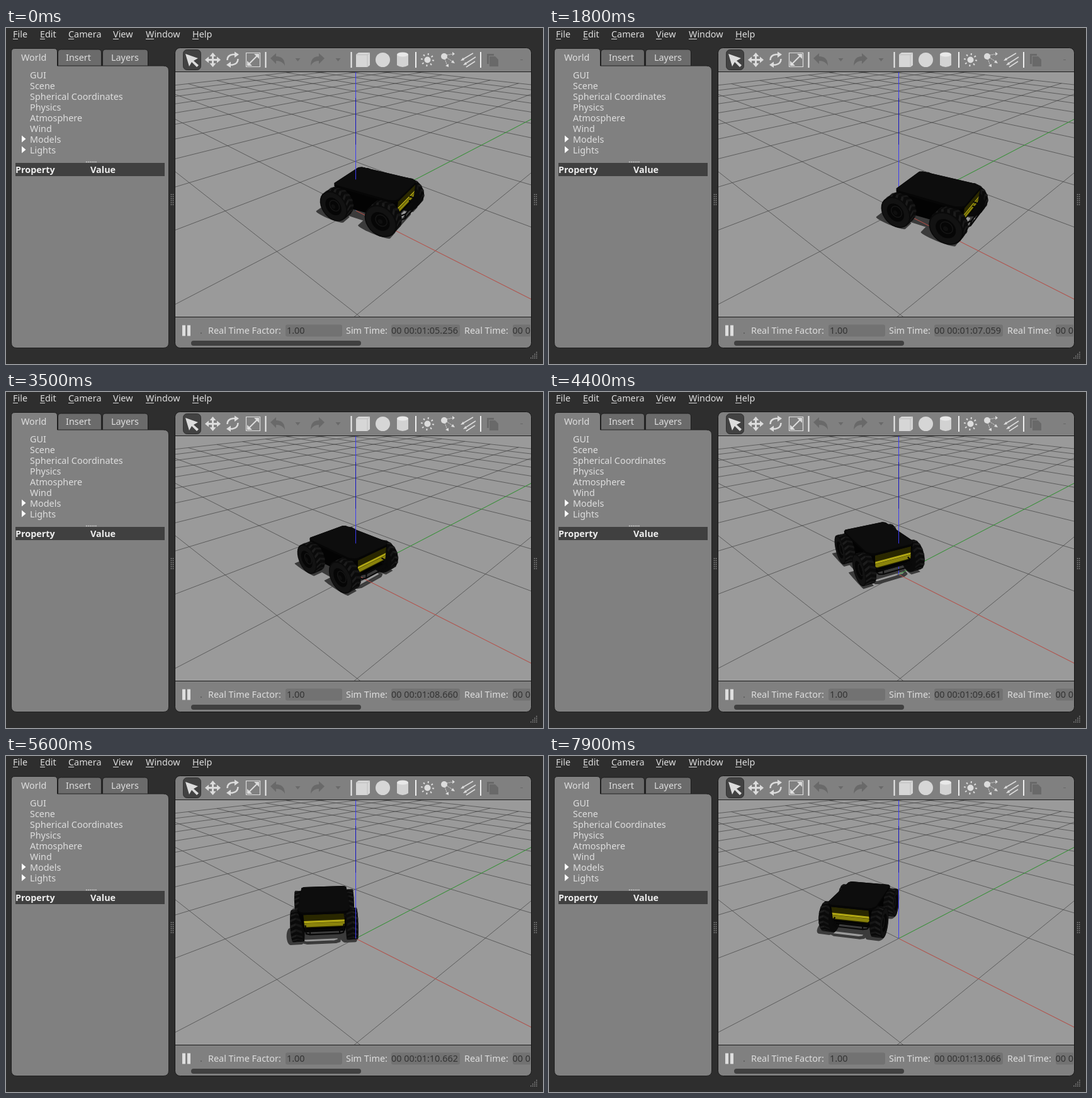
Write an HTML page with a canvas that moves like this. It is 853 px wide and 533 px high and loops after 8 s.

```html
<!DOCTYPE html>
<html lang="en">
<head>
<meta charset="utf-8">
<title>Robot simulator</title>
<style>
html, body { margin: 0; width: 100%; height: 100%; overflow: hidden; background: #2e2e2e; }
svg, canvas { position: absolute; display: block; }
svg { left: 0; top: 0; }
canvas { left: 269px; top: 70px; }
text { font: 14.4px "Noto Sans", "Open Sans", sans-serif; fill: #dedede; white-space: pre; }
.b { font-weight: bold; fill: #eee; }
.d { fill: #333; }
.w { fill: #dcdcdc; }
.g { fill: #696969; }
.l { fill: none; stroke: #dcdcdc; }
</style>
</head>
<body>
<svg width="853" height="533" viewBox="0 0 853 533">
  <g id="menu"></g>
  <!-- left panel -->
  <path d="M82.500 60V39q0-5 5-5H146.500q5 0 5 5V60M153.500 60V39q0-5 5-5H220.500q5 0 5 5V60" fill="#6b6b6b" stroke="#1c1c1c"/>
  <path d="M8.500 499V38q0-5.500 5.500-5.500H76q5.500 0 5.500 5.500V60H250q8.500 0 8.500 8V499q0 8.500-8.500 8.500H17q-8.500 0-8.500-8.500z" fill="#808080" stroke="#202020"/>
  <text x="24" y="52">World</text><text x="95" y="52">Insert</text><text x="167" y="52">Layers</text>
  <g id="tree"></g>
  <path d="M25 170.500l6.500 5.500-6.500 5.500zM25 187.500l6.500 5.500-6.500 5.500z" fill="#fff"/>
  <path d="M127 212.500H145" stroke="#ddd" stroke-width="1.500" stroke-dasharray="1.500 1.500"/>
  <rect x="15" y="214" width="237" height="21" fill="#404040"/>
  <text class="b" x="15" y="230">Property</text><text class="b" x="134" y="230">Value</text>
  <path d="M262.500 263.500V281M265.500 263.500V281M839.500 263.500V281M842.500 263.500V281" stroke="#8c8c8c" stroke-width="1.500" stroke-dasharray="1.500 1.700"/>
  <!-- right panel -->
  <rect x="268.500" y="31.500" width="566" height="476" rx="8" fill="#808080" stroke="#161616"/>
  <path d="M269 69.500H834M269 458.500H834" stroke="#1a1a1a"/>
  <rect x="281.500" y="34.500" width="28" height="32" rx="6" fill="#424242" stroke="#303030"/>
  <path class="w" d="M285 41l20 7-7 4 8 7-3 3-8-8-4 7z"/>
  <path class="w" d="M328.500 39l5 6h-3.500v4h5v-3.500l6 5-6 5V52h-5v4h3.500l-5 6-5-6h3.500v-4h-5v3.500l-6-5 6-5V49h5v-4h-3.500z"/>
  <path class="l" stroke-width="2.500" d="M351.500 51q0-8 9-9h4M368.500 49q0 8-9 9.500h-4"/>
  <path class="w" d="M363 37.500l7 4.500-7 5zM357 53.500l-7 5 7 4.500z"/>
  <path class="l" stroke-width="1.200" d="M381.500 39.500h22v22h-22z"/>
  <path class="l" stroke-width="2" d="M386 57l13-13"/>
  <path class="w" d="M402 41v8l-8-8zM383 60v-8l8 8z"/>
  <path class="g" d="M420 48l9-8v5q14 0 14 15-4-8-14-8v5zM506 48l-9-8v5q-13 0-13 15 4-8 13-8v5zM459.500 48h8l-4 5zM523.500 48h8l-4 5z"/>
  <path d="M412.500 38V63M548.500 38V63M651 38V63M754 38V63" stroke="#eee" stroke-width="2"/>
  <path d="M556 42l4-3h18v20l-4 3h-18z" fill="#d6d6d6"/><path d="M556.500 42.500h17.500V62M574 42.500l4-3" fill="none" stroke="#bebebe"/>
  <circle cx="598.500" cy="50.500" r="11.500" fill="#d6d6d6"/>
  <path d="M621 42v17q9 6 18 0V42z" fill="#d2d2d2"/><ellipse cx="630" cy="42" rx="9" ry="3.500" fill="#e8e8e8"/>
  <circle class="w" cx="669.500" cy="50.500" r="5"/>
  <circle class="l" cx="669.500" cy="50.500" r="9" stroke-width="3" stroke-dasharray="2 5.070"/>
  <circle class="w" cx="696" cy="45" r="5"/>
  <path class="l" stroke-dasharray="2 1" d="M700 43l11-2M700 47l9 6M697 49l4 11"/>
  <path class="w" d="M709 38l4 3-4 3zM707 55l6 1-3-5zM698 60l5 2v-5z"/>
  <path class="l" stroke-width="1.500" d="M742 40l-17 10M746 46l-17 11M745 53l-14 9"/>
  <path class="w" d="M722 52l4-5 2 4zM726 59l4-5 2 4z"/>
  <path class="g" d="M764 41h11v3h-8v13h-3zM768 45h9l5 5v11h-14z"/>
  <path d="M817 50.500h4" stroke="#686868"/>
  <!-- status bar -->
  <path d="M280 471.500h5v17h-5zM288 471.500h5v17h-5z" fill="#dedede"/>
  <text x="308" y="485" style="fill:#555">.</text>
  <text x="321" y="485">Real Time Factor:</text><text x="540" y="485">Sim Time:</text><text x="728" y="485">Real Time:</text>
  <path d="M447 470.500H531q3 0 3 3V486.500q0 3-3 3H447q-3 0-3-3V473.500q0-3 3-3zM615 470.500H718q3 0 3 3V486.500q0 3-3 3H615q-3 0-3-3V473.500q0-3 3-3zM808 470.500H833V489.500H808q-3 0-3-3V473.500q0-3 3-3z" fill="#727272"/>
  <text class="d" x="446" y="485">1.00</text>
  <text class="d" x="612" y="485" id="clock"></text>
  <text class="d" x="804.500" y="485">00 0</text>
  <rect x="294" y="496" width="270" height="8" rx="4" fill="#404040"/>
  <path d="M833 523.500h12M836 520.500h9M839 517.500h6M842 514.500h3" stroke="#8a8a8a" stroke-width="1.600" stroke-dasharray="1.600 1.400"/>
</svg>
<canvas id="view" width="565" height="388"></canvas>
<script>
const LOOP = 8000, STEP = 100;
const $ = id => document.getElementById(id);
const ctx = $('view').getContext('2d');
ctx.translate(-269, -70);

$('menu').innerHTML = [['File', 11, 8], ['Edit', 54, 8], ['Camera', 99, 9], ['View', 170, 9], ['Window', 222, 13], ['Help', 296, 10]]
  .map(([s, x, w]) => `<text x="${x}" y="15">${s}</text><path d="M${x} 17.500h${w}" stroke="#ddd"/>`).join('');
$('tree').innerHTML = ['GUI', 'Scene', 'Spherical Coordinates', 'Physics', 'Atmosphere', 'Wind', 'Models', 'Lights']
  .map((s, i) => `<text x="38" y="${80 + 17 * i}">${s}</text>`).join('');

// Scene space: r to the right, a towards the viewer, z up.
const F = 495, D = 3.387, C = 0.859, S = 0.512;
const EYE = [0, D * C, D * S];
const TURN = Math.PI / 4 - 0.007, CX = Math.cos(TURN), SX = Math.sin(TURN);
const depth = p => D - p[1] * C - p[2] * S;
function project(p) {
  const d = depth(p);
  return [555.5 + F * p[0] / d, 289.5 - F * (p[2] * C - p[1] * S) / d];
}
const world = (x, y, z = 0) => [x * CX + y * SX, x * SX - y * CX, z];

function trace(pts) {
  ctx.beginPath();
  pts.forEach(p => ctx.lineTo(p[0], p[1]));
}
function fill(pts, color) {
  trace(pts);
  ctx.closePath();
  ctx.fillStyle = color;
  ctx.fill();
}
function stroke(pts, color, width = 1) {
  trace(pts);
  ctx.strokeStyle = color;
  ctx.lineWidth = width;
  ctx.lineJoin = 'round';
  ctx.stroke();
}
function line3(p, q, color) {
  const near = 0.05, a = depth(p), b = depth(q);
  if (a < near && b < near) return;
  const cut = (u, v, du, dv) => u.map((c, i) => c + (v[i] - c) * (du - near) / (du - dv));
  if (a < near) p = cut(q, p, b, a);
  if (b < near) q = cut(p, q, a, b);
  stroke([project(p), project(q)], color);
}
function hull(pts) {
  pts = pts.slice().sort((p, q) => p[0] - q[0] || p[1] - q[1]);
  const half = list => {
    const h = [];
    for (const p of list) {
      while (h.length > 1) {
        const [o, m] = h.slice(-2);
        if ((m[0] - o[0]) * (p[1] - o[1]) - (m[1] - o[1]) * (p[0] - o[0]) > 0) break;
        h.pop();
      }
      h.push(p);
    }
    return h.slice(0, -1);
  };
  return half(pts).concat(half(pts.reverse()));
}

// time, r, a, heading in degrees
const PATH = [
  [0, .18, .05, 31.5], [300, .173, .046, 31.5], [500, .183, .052, 31.5], [1100, .382, .175, 31.5],
  [1450, .5, .247, 31.5], [1800, .372, .169, 31.5], [2400, .128, .015, 31.5], [2700, -.005, -.063, 33],
  [3000, -.125, -.138, 37], [3500, -.095, -.088, 45], [3850, -.06, -.05, 50], [4150, -.15, -.13, 55],
  [4400, -.237, -.202, 60], [4900, -.3, -.3, 70], [5200, -.33, -.28, 76], [5600, -.35, -.265, 85],
  [6000, -.36, -.325, 90], [7000, -.39, -.35, 96], [7900, -.425, -.385, 103]
];
function poseAt(t) {
  let i = 1;
  while (i < PATH.length - 1 && PATH[i][0] < t) i++;
  const p = PATH[i - 1], q = PATH[i], k = Math.min(1, (t - p[0]) / (q[0] - p[0]));
  const [r, a, deg] = [1, 2, 3].map(j => p[j] + (q[j] - p[j]) * k);
  return { r, a, h: deg * Math.PI / 180 };
}

// Body parts: x forward, w to the right, z up.
const RADIUS = .167, BASE = .265;
const mirror = half => half.concat(half.slice().reverse().map(([x, w]) => [x, -w]));
const PLATE = mirror([[-.32, .235], [-.29, .262], [.3, .265], [.355, .235], [.37, .205]]);
const plateAt = z => PLATE.map(([x, w]) => [x, w, z]);
const BODY = plateAt(.37).concat(plateAt(.345), [[-.31, -.21, .11], [-.31, .21, .11], [.34, -.21, .13], [.34, .21, .13]]);
const bar = (s, z) => [[.32 * s, -.2, z], [.41 * s, -.19, z], [.43 * s, -.15, z], [.43 * s, .15, z], [.41 * s, .19, z], [.32 * s, .2, z]];
const BARS = s => [bar(s, .15), bar(s, .2), ...[-.15, .15].map(w => [[.43 * s, w, .15], [.43 * s, w, .2]])];
const ring = (x, w, rad, n = 28) => Array.from({ length: n }, (_, i) => {
  const q = i / n * Math.PI * 2;
  return [x + rad * Math.cos(q), w, RADIUS + rad * Math.sin(q)];
});
const tyre = (x, w) => ring(x, w - .057, RADIUS).concat(ring(x, w + .057, RADIUS));

function drawScene(t) {
  const { r, a, h } = poseAt(t), ch = Math.cos(h), sh = Math.sin(h);
  const place = ([x, w, z]) => [r + x * ch - w * sh, a + x * sh + w * ch, z];
  const at = p => project(place(p));
  const shade = p => {
    const [pr, pa, z] = place(p);
    return project([pr - z * .314, pa - z * .472, 0]);
  };
  const wheels = [];
  for (const x of [-BASE, BASE]) for (const w of [-.285, .285]) wheels.push([x, w]);

  ctx.fillStyle = '#9a9a9a';
  ctx.fillRect(269, 70, 565, 388);

  const dark = '#3b3b3b';
  wheels.forEach(([x, w]) => fill(hull(tyre(x, w).map(shade)), dark));
  fill(hull(BODY.map(shade)), dark);
  for (const s of [-1, 1]) BARS(s).forEach(b => stroke(b.map(shade), dark, 3));

  for (let i = -10; i <= 10; i++) {
    line3(world(i, -10), world(i, 10), 'rgba(66,66,66,.7)');
    line3(world(-10, i), world(10, i), 'rgba(66,66,66,.7)');
  }
  line3(world(0, 0), world(10, 0), 'rgba(232,84,74,.75)');
  line3(world(0, 0), world(0, 10), 'rgba(50,175,50,.8)');
  const axis = z => {
    line3([0, 0, z], [0, 0, 1.6], '#3c3cf4');
    line3([0, 0, .74], [0, 0, 1.17], '#1010c4');
  };
  axis(0);

  // robot
  const spin = (r * ch + a * sh) / RADIUS;
  const drawWheel = ([x, w]) => {
    const side = Math.sign(w), out = w + side * .057;
    fill(hull(tyre(x, w).map(at)), '#0a0a0a');
    const n = 18;
    for (let i = 0; i < n; i++) {
      const rim = (k, y, rad) => {
        const q = (i + k) / n * Math.PI * 2 - spin;
        return [x + rad * Math.cos(q), y, RADIUS + rad * Math.sin(q)];
      };
      const p = place(rim(.2, w, RADIUS)), c = place([x, w, RADIUS]);
      const facing = p.reduce((sum, v, j) => sum + (v - c[j]) * (EYE[j] - v), 0);
      if (facing < 0) continue;
      const edge = RADIUS + .003, inner = w - side * .057;
      fill([rim(0, out, edge), rim(.45, out, edge), rim(.85, w, edge), rim(.45, w, edge)].map(at), '#1c1c1c');
      fill([rim(.45, w, edge), rim(.85, w, edge), rim(.45, inner, edge), rim(0, inner, edge)].map(at), '#161616');
    }
    const face = place([x, out, RADIUS]);
    if (((EYE[0] - face[0]) * -sh + (EYE[1] - face[1]) * ch) * side > 0) {
      fill(ring(x, out, .155).map(at), '#121212');
      fill(ring(x, out, .098).map(at), '#060606');
      const hub = ring(x, out - side * .02, .06).map(at);
      stroke(hub.concat([hub[0]]), '#151515', 1.5);
      fill(ring(x, out, .025).map(at), '#0e0e0e');
    }
  };
  const nearSide = r * sh + (EYE[1] - a) * ch > 0 ? 1 : -1;
  const sorted = wheels.sort((p, q) => depth(place([...q, .16])) - depth(place([...p, .16])));
  const bumper = s => BARS(s).forEach(b => stroke(b.map(at), '#090909', 2.2));

  sorted.filter(p => p[1] * nearSide < 0).forEach(drawWheel);
  bumper(-1);
  fill(hull(BODY.map(at)), '#030303');
  const panel = (lo, hi, color) => fill([[.365, -.205, lo], [.365, .205, lo], [.37, .205, hi], [.37, -.205, hi]].map(at), color);
  panel(.195, .345, '#292700');
  panel(.205, .25, '#8a830c');
  panel(.25, .276, '#b2a814');
  bumper(1);
  sorted.filter(p => p[1] * nearSide > 0).forEach(drawWheel);
  fill(plateAt(.345).map(at), '#060606');
  fill(plateAt(.37).map(at), '#0d0d0d');

  // the upright axis pierces the plate or stands in front of the robot
  const ox = -r * ch - a * sh, ow = r * sh - a * ch;
  if (Math.abs(ow) < .27 && ox > -.32 && ox < .37) axis(.37);
  else if (a < -.15) axis(0);
}

// The clock ticks by about 200 ms and gains a few ms along the way.
const GAINS = [[7, 3], [15, 1], [20, 1], [25, 1], [30, 2], [34, 2]];
function clockAt(t) {
  const n = Math.floor(t * .00494 + .3);
  const ms = 65256 + 200 * n + GAINS.reduce((sum, [k, v]) => sum + (n >= k ? v : 0), 0);
  const sec = (ms % 60000 / 1000).toFixed(3).padStart(6, '0');
  return `00 00:0${Math.floor(ms / 60000)}:${sec}`;
}

let shown = -1;
const start = performance.now();
function tick(now) {
  const t = Math.floor(Math.max(0, now - start) % LOOP / STEP) * STEP;
  if (t !== shown) {
    shown = t;
    drawScene(t);
    $('clock').textContent = clockAt(t);
  }
  requestAnimationFrame(tick);
}
tick(start);
</script>
</body>
</html>
```
